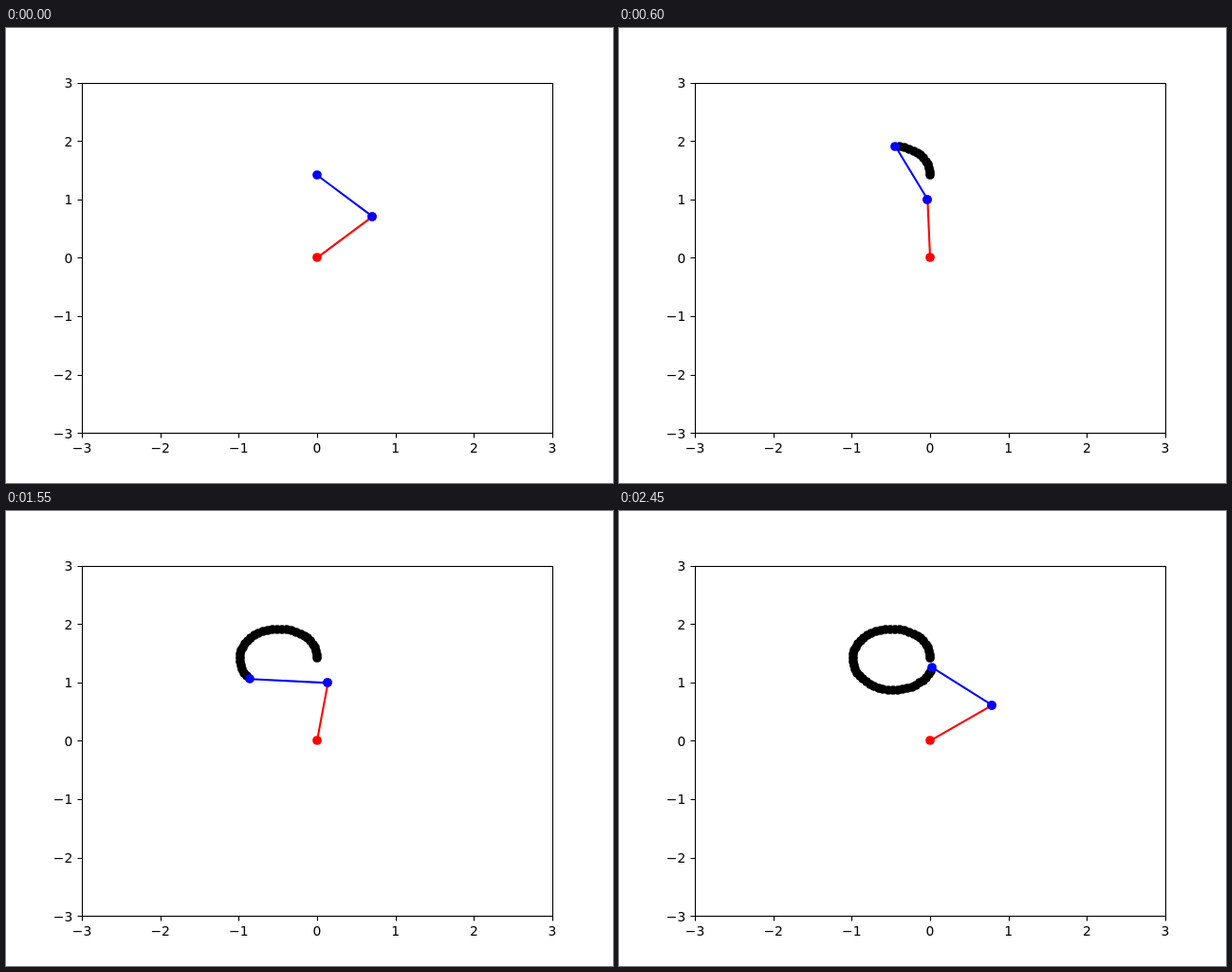
Recreate the animation shown at these times as an HTML page. Size 640x480 px, loop 2500 ms.

```html
<!DOCTYPE html>
<html lang="en">
<head>
<meta charset="utf-8">
<title>Two-link arm</title>
<style>
  html, body { margin: 0; width: 100%; height: 100%; overflow: hidden; background: #fff; }
  svg { display: block; }
  text { font: 13.889px "DejaVu Sans", sans-serif; }
</style>
</head>
<body>
<svg id="stage" width="640" height="480" viewBox="0 0 640 480"></svg>
<script>
const STEPS = 50, STEP_MS = 50, RADIUS = 0.5, DOT = 4.86;
const stage = document.getElementById("stage");
const px = x => 328 + x * 496 / 6;
const py = y => 242.4 - y * 369.6 / 6;

function add(tag, attrs, text) {
  const el = document.createElementNS("http://www.w3.org/2000/svg", tag);
  set(el, attrs);
  if (text) el.textContent = text;
  return stage.appendChild(el);
}

function set(el, attrs) {
  for (const k in attrs) el.setAttribute(k, attrs[k]);
}

// Markers sit on whole pixels, links do not.
const place = (dot, p) => set(dot, { cx: Math.round(px(p.x)), cy: Math.round(py(p.y)) });
const join = (link, a, b) => set(link, { x1: px(a.x), y1: py(a.y), x2: px(b.x), y2: py(b.y) });
const addDot = fill => add("circle", { r: DOT, fill });
const addLink = stroke => add("line", { stroke, "stroke-width": 2.083 });

// Joint angles follow a circular tip velocity through the inverse Jacobian, one Euler step per pose.
function simulate() {
  const poses = [], d = 2 * Math.PI / STEPS;
  let q1 = Math.PI / 4, q2 = Math.PI / 2;
  for (let i = 0; i < STEPS; i++) {
    const elbow = { x: Math.cos(q1), y: Math.sin(q1) };
    const fx = Math.cos(q1 + q2), fy = Math.sin(q1 + q2);
    const tip = { x: elbow.x + fx, y: elbow.y + fy };
    poses.push({ elbow, tip });
    const vx = -RADIUS * Math.sin(i * d) * d;
    const vy = RADIUS * Math.cos(i * d) * d;
    const det = Math.sin(q2);
    q1 += (fx * vx + fy * vy) / det;
    q2 -= (tip.x * vx + tip.y * vy) / det;
  }
  return poses;
}

function drawAxes() {
  const line = { fill: "none", stroke: "#000", "stroke-width": 1.111 };
  add("rect", { x: 80.5, y: 58.5, width: 496, height: 369, ...line });
  for (let v = -3; v <= 3; v++) {
    const label = String(v).replace("-", "\u2212");
    const x = px(v), y = py(v);
    const tx = Math.round(x) + 0.5, ty = Math.round(y) + 0.5;
    add("path", { d: `M${tx} 427.5V432.5M75.5 ${ty}H80.5`, ...line });
    add("text", { x, y: 448, "text-anchor": "middle" }, label);
    add("text", { x: 70.3, y: Math.round(y + 5.3), "text-anchor": "end" }, label);
  }
}

const poses = simulate();
const base = { x: 0, y: 0 };

drawAxes();
const trail = poses.map(p => {
  const dot = addDot("#000");
  place(dot, p.tip);
  return dot;
});
const lower = addLink("#f00");
place(addDot("#f00"), base);
const lowerEnd = addDot("#f00");
const upper = addLink("#00f");
const elbowDot = addDot("#00f");
const tipDot = addDot("#00f");

function render(ms) {
  const i = Math.floor(ms / STEP_MS) % STEPS;
  const { elbow, tip } = poses[i];
  trail.forEach((dot, k) => set(dot, { visibility: k < i ? "visible" : "hidden" }));
  join(lower, base, elbow);
  join(upper, elbow, tip);
  place(lowerEnd, elbow);
  place(elbowDot, elbow);
  place(tipDot, tip);
}

const start = performance.now();
function tick() {
  render(performance.now() - start);
  requestAnimationFrame(tick);
}
tick();
</script>
</body>
</html>
```
